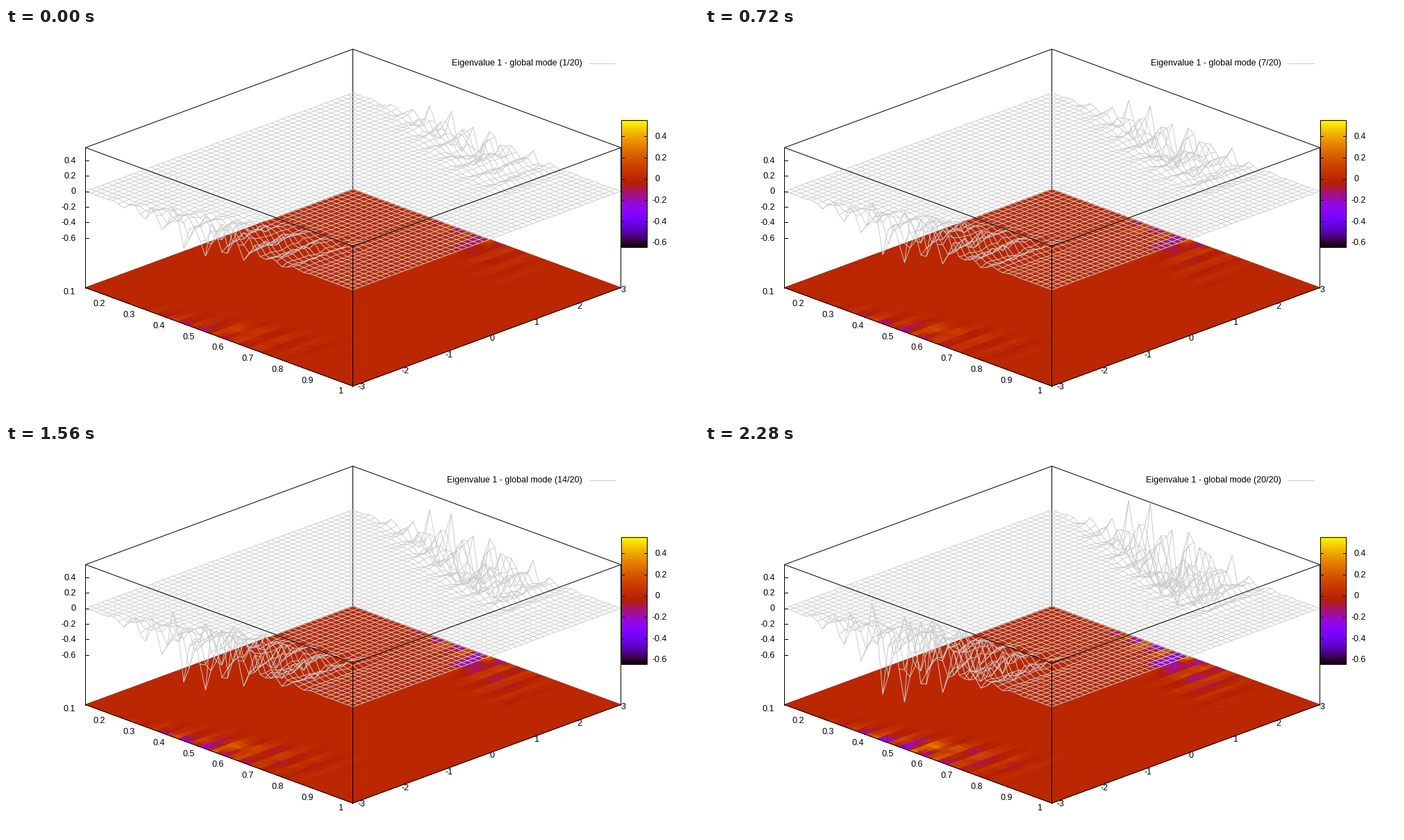
Recreate the animation shown at these times as a matplotlib script. Size 998 by 561 pixels, loop 2.4 s.

```python
import numpy as np
import matplotlib.pyplot as plt
from matplotlib.animation import FuncAnimation
from matplotlib.collections import LineCollection, PolyCollection

W, H, DPI = 998, 561, 100
N, STEPS = 50, 20
GROWTH = .0465
ZMIN, ZMAX = -.64, .555
GREY = "#cacaca"
plt.rcParams["font.family"] = "Liberation Sans"
plt.rcParams["font.size"] = 9


def bell(x, lo, hi):
    return np.exp(-(x / np.where(x < 0, lo, hi)) ** 2)


def edge_wave(rng):
    """Wave packet running along one edge; d is the distance from it."""
    i, d = np.mgrid[0:N, 0:N]
    edge = .3 * bell(i - 20, 9, 12) * np.exp(-1.2 * d)
    inner = .3 * bell(i - 20 - 1.6 * d, 9, 10) * np.exp(-(d / 8) ** 2)
    inner = inner * bell(np.maximum(i - 37, 0), 1, 3)
    carrier = np.cos(2 * np.pi * (i - 18) / 3.7)
    dent = .45 * bell(i - 25, 1, 1) * bell(d - 3.5, 2, 2)
    rough = rng.normal(size=(N, N))
    return (edge + inner) * (carrier + .3 * rough) - dent


def project(i, j, y0):
    k = 1 / (N - 1)
    return np.stack([114 + (385 * i + 385.5 * j) * k, y0 + 142 * (i - j) * k], -1)


def palette(z):
    t = np.clip((z - ZMIN) / (ZMAX - ZMIN), 0, 1)
    return np.stack([np.sqrt(t), t ** 3, np.clip(np.sin(2 * np.pi * t), 0, 1)], -1)


# The mode is odd: troughs on the near edge, peaks on the far one
rng = np.random.default_rng(5)
mode = np.clip(edge_wave(rng)[:, ::-1] - edge_wave(rng), ZMIN, ZMAX)
cells = (mode[:-1, :-1] + mode[1:, :-1] + mode[:-1, 1:] + mode[1:, 1:]).ravel() / 4
I, J = np.mgrid[0:N, 0:N]
sheet, base = project(I, J, 235), project(I, J, 374)

fig = plt.figure(figsize=((W + .01) / DPI, (H + .01) / DPI), dpi=DPI, facecolor="white")
ax = fig.add_axes([0, 0, 1, 1])
ax.axis("off")


def line(*pts, z=5, color="black"):
    x, y = zip(*pts)
    ax.plot(x, y, color=color, lw=.72, zorder=z)


def label(x, y, s, ha="center"):
    return ax.text(x - .5, y - .7, s, ha=ha, va="center_baseline", zorder=6)


def up(p):
    return p[0], p[1] - 202


# Box
left, back, right, front = (114, 374), (499, 232), (885, 374), (499, 516)
line(left, back, right, z=1)
line(back, up(back), z=1)
line(up(left), up(back), up(right), z=1)
line(left, front, right)
line(up(left), up(front), up(right))
for corner in (left, right, front):
    line(corner, up(corner))

# Coloured floor and wire sheet
quads = np.stack([base[:-1, :-1], base[1:, :-1], base[1:, 1:], base[:-1, 1:]], 2)
floor = PolyCollection(quads.reshape(-1, 4, 2), antialiased=False, lw=0, zorder=2)
mesh = LineCollection([], colors=GREY, linewidths=.68, zorder=4)
ax.add_collection(floor)
ax.add_collection(mesh)

# Axis labels
for n in range(-3, 3):
    y = 235 - n * 22.4
    line((114, y), (119, y))
    label(101, y, f"{n / 5:g}", "right")
label(91, 380, "0.1")
for n in range(8):
    label(134 + 42.9 * n, 397 + 15.75 * n, f"{.2 + n / 10:.1f}")
label(482, 523, "1")
for n in range(-3, 4):
    label(700.5 + 62.9 * n, 447 - 23.3 * n, str(n))

# Colour bar
ramp = palette(np.linspace(ZMAX, ZMIN, 184))[:, None]
ax.imshow(ramp, extent=(886, 923, 315, 132), aspect="auto", zorder=3)
line((886, 132), (923, 132), (923, 315), (886, 315), (886, 132))
for n in range(-3, 3):
    y = 217 - n * 30.6
    line((886, y), (890, y))
    line((919, y), (923, y))
    label(931 if n < 0 else 934.5, y, f"{n / 5:g}", "left")

title = label(830, 49.5, "", "right")
line((840, 50), (877, 50), color=GREY)

# Pixel centres, just below the rounding point of line snapping
ax.set_xlim(-.49, W - .49)
ax.set_ylim(H - .51, -.51)


def draw(k):
    z = mode * np.exp(GROWTH * (k + 1 - STEPS))
    pts = sheet - np.stack([0 * z, 112 * z], -1)
    mesh.set_segments([*pts, *pts.swapaxes(0, 1)])
    floor.set_facecolor(palette(cells * np.exp(GROWTH * (k + 1 - STEPS))))
    title.set_text(f"Eigenvalue 1 - global mode ({k + 1}/{STEPS})")
    return mesh, floor, title


anim = FuncAnimation(fig, draw, frames=STEPS, interval=120, repeat=True, repeat_delay=0)
plt.show()
```
